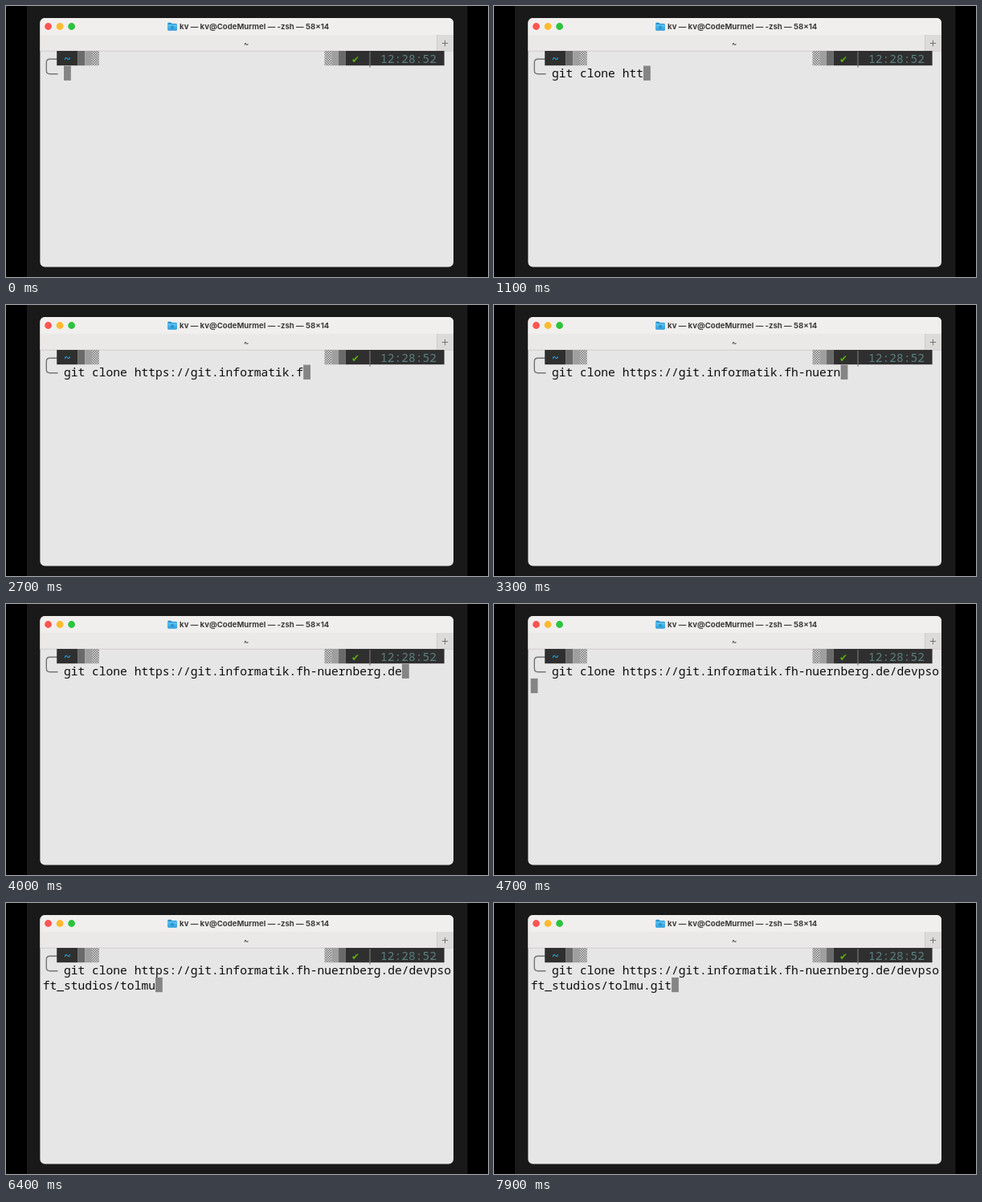
Animation, 600 px wide and 338 px high, one loop 8 s. Source, as an HTML page:

```html
<!DOCTYPE html>
<html lang="en">
<head>
<meta charset="utf-8">
<title>Terminal</title>
<style>
  html, body { margin: 0; width: 100%; height: 100%; overflow: hidden; background: #000; }
  svg { display: block; width: 100vw; height: 100vh; }
  .mono { font: 14.61px "Noto Sans Mono", "DejaVu Sans Mono", monospace; white-space: pre; }
  .title { font: 700 9.6px Inter, "Liberation Sans", sans-serif; fill: #3c3a3a; }
  .check { font: 12px "DejaVu Sans", sans-serif; }
</style>
</head>
<body>
<svg viewBox="0 0 600 338" preserveAspectRatio="none">
  <defs>
    <pattern id="dots" width="3" height="3" patternUnits="userSpaceOnUse">
      <path d="M0 0h1.5v1.5h-1.5zM1.5 1.5h1.5v1.5h-1.5z" fill="#6c6c6c"/>
    </pattern>
    <linearGradient id="folder" x2="0" y2="1">
      <stop stop-color="#5cc6f4"/>
      <stop offset="1" stop-color="#2f9fdc"/>
    </linearGradient>
    <clipPath id="frame"><rect x="42.4" y="15" width="514.6" height="310.6" rx="6"/></clipPath>
  </defs>

  <rect width="600" height="338" fill="#000"/>
  <rect x="26" width="548.5" height="338" fill="#191919"/>

  <g clip-path="url(#frame)">
    <rect x="42" y="15" width="516" height="312" fill="#e7e6e7"/>
    <rect x="42" y="15" width="516" height="21" fill="#f1efee"/>
    <rect x="42" y="36" width="516" height="20" fill="#ebe9e8"/>
    <rect x="536.5" y="36" width="21" height="20" fill="#dddbda"/>
    <path d="M536.5 36V56" stroke="#c8c6c5" stroke-width=".8"/>
    <path d="M42 56.2H558" stroke="#c9c7c6" stroke-width=".8"/>
    <path d="M542.8 46.5H550.2M546.5 42.8V50.2" stroke="#747272"/>
  </g>

  <circle cx="52.5" cy="25.5" r="4.4" fill="#fc5650"/>
  <circle cx="67.1" cy="25.5" r="4.4" fill="#fdbb2e"/>
  <circle cx="81.6" cy="25.5" r="4.4" fill="#2bc53f"/>

  <path d="M201.3 21.7q0-1 1-1h3l1.3 1.2h5.2q1 0 1 1v6.6q0 1-1 1h-9.5q-1 0-1-1z" fill="#2692cf"/>
  <rect x="201.3" y="22.9" width="11.5" height="7.6" rx="1" fill="url(#folder)"/>
  <path d="M204.6 26.6l2.4-2 2.4 2h-.7v2h-3.4v-2z" fill="#2c8fc6"/>
  <text class="title" x="216" y="28.6" xml:space="preserve">kv — kv@CodeMurmel — -zsh — 58×14</text>
  <text class="title" x="299.3" y="49.6" text-anchor="middle" style="font-weight:500">~</text>

  <path d="M64.5 66.3H54.5Q50.3 66.3 50.3 70.5V80.6Q50.3 84.8 54.5 84.8H64.5"
        fill="none" stroke="#767576" stroke-width="1.4"/>
  <g id="bar"></g>
  <path d="M453 57V76.5" stroke="#747474" stroke-width="1.2"/>
  <text class="mono" x="76.4" y="71" text-anchor="middle" fill="#18a9f6" style="font-weight:700">~</text>
  <text class="check" x="435" y="70.6" text-anchor="middle" fill="#5cb010">✔</text>
  <text class="mono" x="466" y="71" fill="#5b8080">12:28:52</text>

  <rect id="cursor" width="8.8" height="18.3" fill="#868586"/>
  <text class="mono" id="line0" y="89.4" fill="#0c0c0c"></text>
  <text class="mono" id="line1" y="107.6" fill="#0c0c0c"></text>
</svg>
<script>
  const LOOP = 8000, TICK = 100;
  const LEFT = 45.7, COL = 8.77, ROW = 18.3, TOP = 74.6;
  const COLS = 58, INDENT = 3;
  const command = "git clone https://git.informatik.fh-nuernberg.de/devpsoft_studios/tolmu.git";

  // [time in ms, characters typed]
  const typing = [
    [0, 0], [700, 10], [900, 10], [1000, 11], [1100, 13], [1300, 15],
    [1400, 15], [2000, 22], [2500, 33], [2600, 33], [3300, 41],
    [4700, 55], [5400, 64], [6900, 75], [LOOP, 75]
  ];

  const $ = id => document.getElementById(id);
  const colX = c => LEFT + c * COL;
  const split = COLS - INDENT;

  // [first column, width in columns, fill]
  const cells = [
    [2, 3, "#2f2f2f"], [5, 1, "#6a6a6a"], [6, 1, "#a09fa0"], [7, 1, "url(#dots)"],
    [40, 1, "url(#dots)"], [41, 1, "#a09fa0"], [42, 1, "#6a6a6a"], [43, 14, "#2f2f2f"]
  ];
  for (const [c, w, fill] of cells) {
    const r = document.createElementNS("http://www.w3.org/2000/svg", "rect");
    const box = { x: colX(c), y: 56, width: w * COL, height: 18.2, fill };
    for (const k in box) r.setAttribute(k, box[k]);
    $("bar").append(r);
  }

  $("line0").setAttribute("x", colX(INDENT));
  $("line1").setAttribute("x", colX(0));

  function typed(t) {
    const i = typing.findIndex(k => k[0] > t);
    const [t0, n0] = typing[i - 1], [t1, n1] = typing[i];
    return Math.round(n0 + (n1 - n0) * (t - t0) / (t1 - t0));
  }

  function draw(ms) {
    const t = Math.floor(ms % LOOP / TICK) * TICK;
    const n = typed(t), pos = n + INDENT;
    $("line0").textContent = command.slice(0, Math.min(n, split));
    $("line1").textContent = command.slice(split, Math.max(n, split));
    $("cursor").setAttribute("x", colX(pos % COLS));
    $("cursor").setAttribute("y", TOP + Math.floor(pos / COLS) * ROW);
  }

  const start = performance.now();
  function tick() {
    draw(performance.now() - start);
    requestAnimationFrame(tick);
  }
  tick();
</script>
</body>
</html>
```
